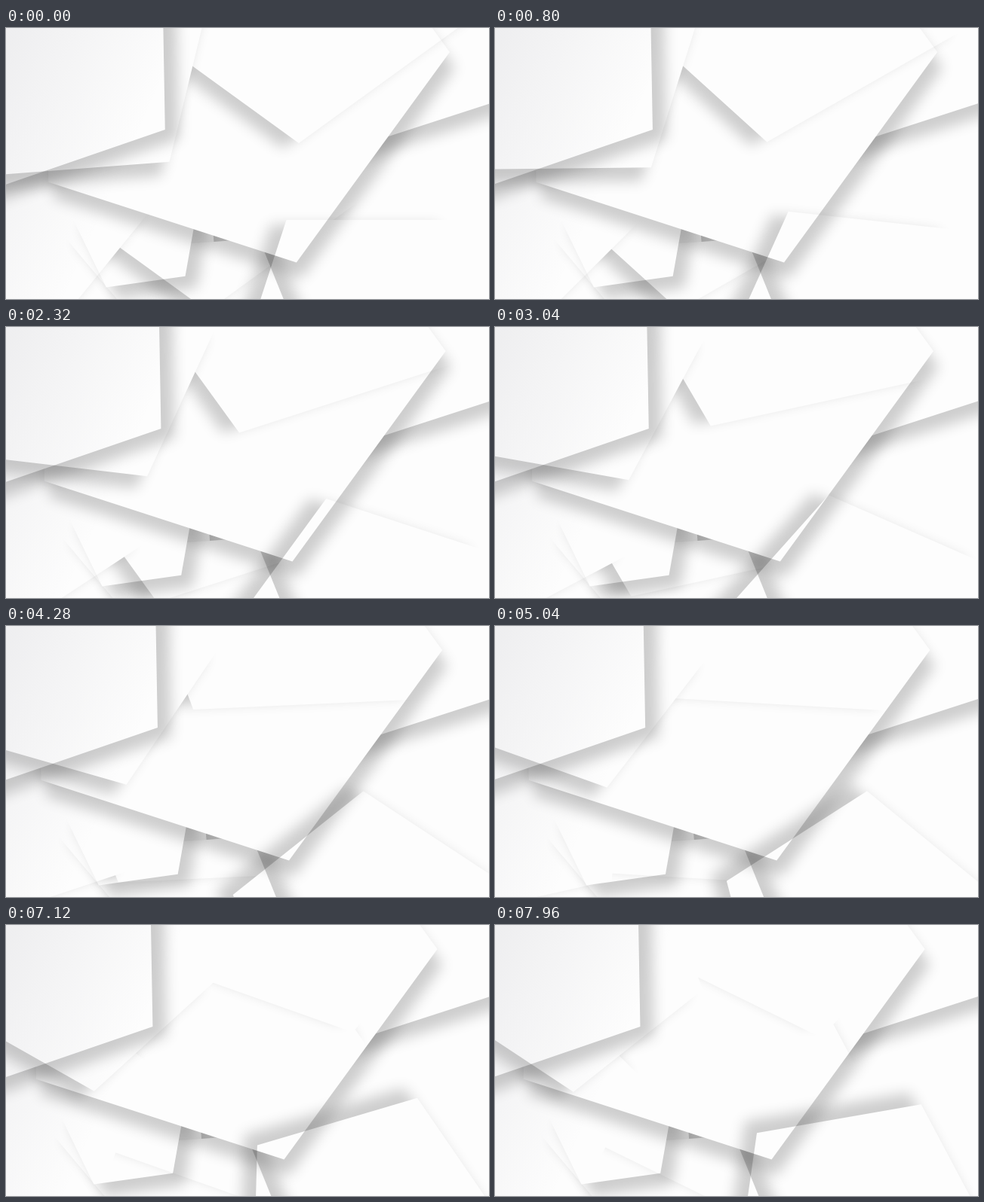
Animation of 640x360 px, one loop 8 s. Source, as an HTML page with a canvas:

```html
<!DOCTYPE html>
<html lang="en">
<head>
<meta charset="utf-8">
<title>Layered paper pentagons</title>
<style>
  html, body { margin: 0; width: 100%; height: 100%; overflow: hidden; background: #fdfdfd; }
  canvas { display: block; width: 100vw; height: 100vh; }
</style>
</head>
<body>
<canvas id="stage" width="640" height="360"></canvas>
<script>
const W = 640, H = 360, LOOP = 8000;
const PAPER = '#fdfdfd';
const DRIFT = -2.3;            // px per second
const SHADOW = { color: 'rgba(0,0,0,.19)', offset: 22, blur: 18 };
const RAD = Math.PI / 180;

// Angles in degrees, spin in degrees per second; each list runs from bottom to top.
const sheet = (x, y, radius, angle, spin = 0) => ({ x, y, radius, angle, spin });

const turning = [
  sheet(267, 161, 215, 90, 7.8),
  sheet(30, 228, 166, 75, 7.6),
  sheet(388, -101, 254, 90, 7.8),
  sheet(482, 407, 188, 90, 7.8),
  sheet(96, 36, 186, 49.6, 4.77)
];
const drifting = [
  sheet(185, 267, 110, -40),
  sheet(277, 373, 110, -58),
  sheet(175, 265, 90, -26),
  sheet(525, -117, 300, -36),
  sheet(294, 32, 294, 0),
  sheet(-35, -37, 300, -37)
];

const stage = document.getElementById('stage').getContext('2d');
const layer = document.createElement('canvas');
layer.width = W;
layer.height = H;
const ctx = layer.getContext('2d');

function drawSheet({ x, y, radius, angle, spin }, seconds, shift) {
  const turn = angle + spin * seconds;
  const light = (turn + 72) * RAD;   // the shadow turns with its sheet
  ctx.shadowColor = SHADOW.color;
  ctx.shadowBlur = SHADOW.blur;
  ctx.shadowOffsetX = SHADOW.offset * Math.cos(light);
  ctx.shadowOffsetY = SHADOW.offset * Math.sin(light);
  ctx.beginPath();
  for (let corner = 0; corner < 5; corner++) {
    const a = (turn + corner * 72) * RAD;
    ctx.lineTo(x + shift + radius * Math.cos(a), y + radius * Math.sin(a));
  }
  ctx.closePath();
  ctx.fillStyle = '#fff';
  ctx.fill();
}

// Each stack hides its own lower sheets; the stacks are then multiplied together.
function drawStack(sheets, seconds, shift) {
  ctx.shadowColor = 'transparent';
  ctx.fillStyle = '#fff';
  ctx.fillRect(0, 0, W, H);
  sheets.forEach(s => drawSheet(s, seconds, shift));
  stage.globalCompositeOperation = 'multiply';
  stage.drawImage(layer, 0, 0);
}

function drawBackground() {
  stage.globalCompositeOperation = 'source-over';
  stage.fillStyle = PAPER;
  stage.fillRect(0, 0, W, H);
  const shade = stage.createLinearGradient(0, 30, 190, 115);
  shade.addColorStop(0, 'rgba(60,60,80,.075)');
  shade.addColorStop(1, 'rgba(60,60,80,0)');
  stage.fillStyle = shade;
  stage.fillRect(0, 0, W, H);
}

const start = performance.now();
function tick() {
  const seconds = ((performance.now() - start) % LOOP) / 1000;
  drawBackground();
  drawStack(turning, seconds, 0);
  drawStack(drifting, seconds, DRIFT * seconds);
  requestAnimationFrame(tick);
}
tick();
</script>
</body>
</html>
```
